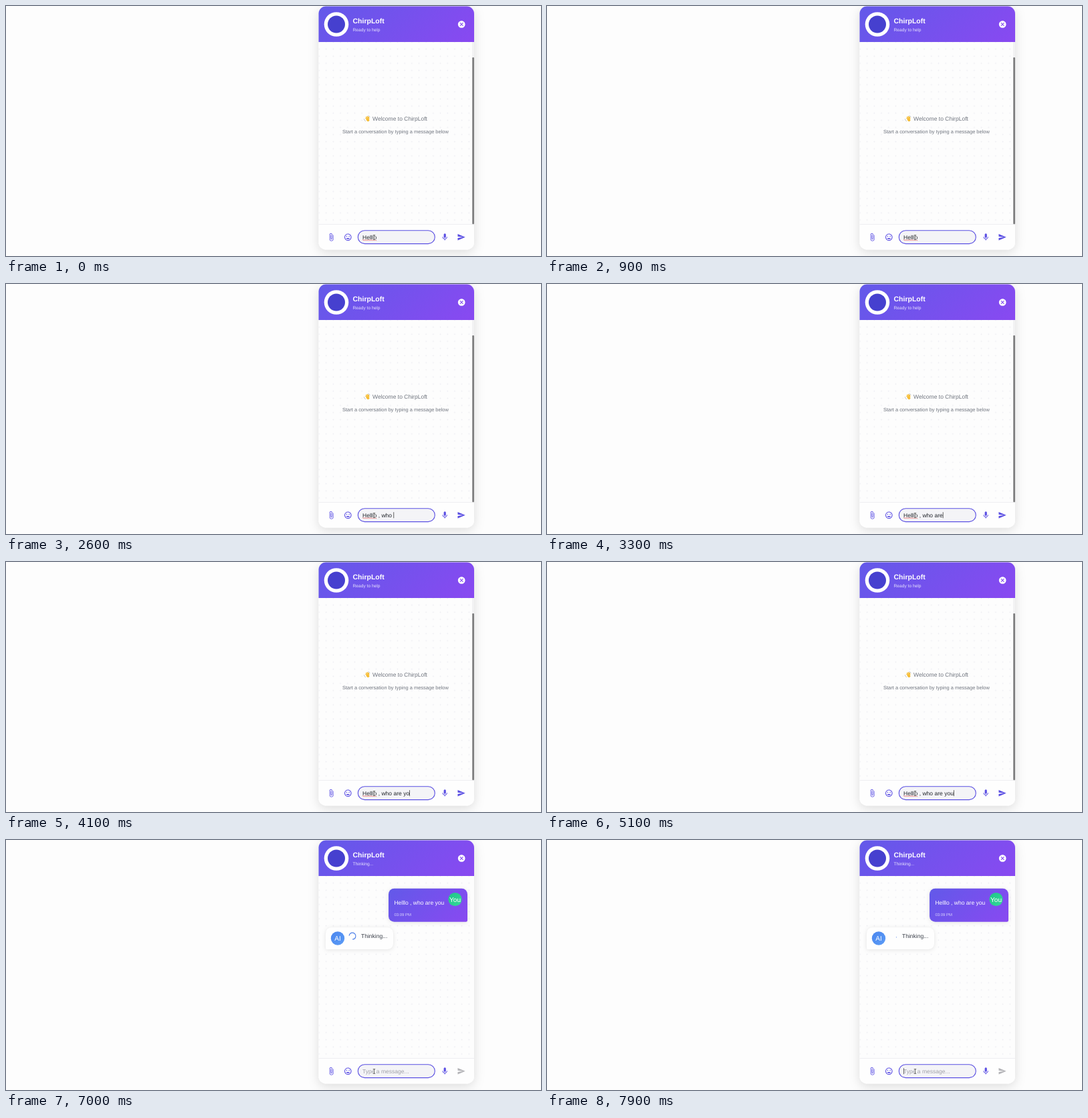
These frames come from a looping animation (800 by 375 pixels, 8 s). An HTML page:

```html
<!DOCTYPE html>
<html lang="en">
<head>
<meta charset="utf-8">
<title>Chat widget</title>
<style>
  html, body { margin: 0; width: 100%; height: 100%; overflow: hidden; background: #fdfdfd; }
  svg { display: block; width: 800px; height: 375px; }
  text {
    font: 8.54px "Liberation Sans", Arial, sans-serif;
    white-space: pre;
    text-rendering: geometricPrecision;
  }
  .window { filter: drop-shadow(0 4px 8px rgba(0, 0, 0, .13)); }
  .soft { filter: drop-shadow(0 1px 3px rgba(0, 0, 0, .1)); }
  .title { font-size: 10.5px; font-weight: bold; fill: #fff; }
  .status { font-size: 6.65px; fill: #e8e4fd; }
  .muted { fill: #70757f; }
  .hint { font-size: 7.49px; }
  .badge { font-size: 10px; fill: #fff; text-anchor: middle; }
  .time { font-size: 5.96px; fill: #d9d2fb; }
  .icon { fill: #5b4fe3; }
</style>
</head>
<body>
<svg viewBox="0 0 800 375">
  <defs>
    <linearGradient id="head" gradientUnits="userSpaceOnUse" x1="512" y1="-44" x2="656" y2="99">
      <stop offset="0" stop-color="#6259e9"/>
      <stop offset="1" stop-color="#8949f1"/>
    </linearGradient>
    <linearGradient id="bubble" gradientUnits="userSpaceOnUse" x1="589" y1="56" x2="673" y2="140">
      <stop offset="0" stop-color="#6259e9"/>
      <stop offset="1" stop-color="#8949f1"/>
    </linearGradient>
    <linearGradient id="blue" x2="1" y2="1">
      <stop offset="0" stop-color="#4a86ee"/>
      <stop offset="1" stop-color="#5c9cf6"/>
    </linearGradient>
    <linearGradient id="green" x2="1" y2="1">
      <stop offset="0" stop-color="#1fc587"/>
      <stop offset="1" stop-color="#34d99a"/>
    </linearGradient>
    <pattern id="dots" patternUnits="userSpaceOnUse" x="462.7" y="59.3" width="10.68" height="10.68">
      <circle cx="5.34" cy="5.34" r=".9" fill="#ececf1"/>
    </pattern>
    <clipPath id="frame"><rect x="467.5" y=".5" width="232.5" height="365" rx="10.7"/></clipPath>
  </defs>

  <rect width="800" height="375" fill="#fdfdfd"/>
  <rect class="window" x="467.5" y=".5" width="232.5" height="365" rx="10.7" fill="#fefefe"/>
  <g clip-path="url(#frame)">
    <rect x="467" y="54" width="234" height="273" fill="#fdfdfd"/>
    <rect x="467" y="54" width="234" height="273" fill="url(#dots)"/>
    <rect x="467" y="0" width="234" height="54" fill="url(#head)"/>
    <rect x="467" y="327" width="234" height="39" fill="#fefefe"/>
    <rect x="467" y="327" width="234" height=".6" fill="#e6e6ea"/>
  </g>

  <circle cx="494" cy="27.5" r="18.3" fill="#fff"/>
  <circle cx="494" cy="27.5" r="13" fill="#4640cf"/>
  <text class="title" x="518.5" y="26">ChirpLoft</text>
  <text class="status" id="status" x="518.5" y="38.2"></text>
  <path fill="#fff" transform="translate(674.8 21.1) scale(.534)" d="M12 2C6.47 2 2 6.47 2 12s4.47 10 10 10 10-4.47 10-10S17.53 2 12 2zm5 13.59L15.59 17 12 13.41 8.41 17 7 15.59 10.59 12 7 8.41 8.41 7 12 10.59 15.59 7 17 8.41 13.41 12 17 15.59z"/>

  <g id="welcome">
    <g fill="none" stroke="#f6bd35" stroke-linecap="round">
      <g stroke-width="1.4">
        <path d="M538 168.2l2.4 2.6M538.6 166.4l3 3.4M540.4 165.8l2.4 3M542.6 168.8l-.2-2.2"/>
      </g>
      <path stroke-width="4" d="M540.7 170.4l.7.7"/>
      <path stroke="#9a9fa8" stroke-width=".6" d="M535.4 169.6q.2 2.4 2.2 3.2M541.8 164.6q1.7.2 2.2 1.7"/>
    </g>
    <text class="muted" x="548" y="171.9">Welcome to ChirpLoft</text>
    <text class="muted hint" x="503" y="190.7">Start a conversation by typing a message below</text>
    <rect x="697" y="54" width="3" height="273" fill="#f2f2f3"/>
    <rect x="697.2" y="77" width="2.8" height="250.3" rx="1.3" fill="#7f7f80"/>
  </g>

  <g id="talk">
    <path class="soft" fill="url(#bubble)" d="M580.5 72.7h101a8.5 8.5 0 0 1 8.5 8.5v39.4a2.2 2.2 0 0 1-2.2 2.2h-107.3a8.5 8.5 0 0 1-8.5-8.5v-33.1a8.5 8.5 0 0 1 8.5-8.5z"/>
    <text x="580.4" y="96.8" fill="#fff">Helllo , who are you</text>
    <text class="time" x="580.4" y="114.3">03:09 PM</text>
    <circle cx="671.5" cy="89" r="10.1" fill="url(#green)"/>
    <text class="badge" x="671.5" y="92.6">You</text>

    <path class="soft" fill="#fefefe" d="M486.5 131.3h84a8.5 8.5 0 0 1 8.5 8.5v15.7a8.5 8.5 0 0 1-8.5 8.5h-90.3a2.2 2.2 0 0 1-2.2-2.2v-22a8.5 8.5 0 0 1 8.5-8.5z"/>
    <circle cx="496" cy="147.5" r="10.2" fill="url(#blue)"/>
    <text class="badge" x="496" y="151.1">AI</text>
    <circle id="spin" cx="518" cy="144" r="4.9" fill="none" stroke="#4d7fe8" stroke-width="1.1"/>
    <text x="531" y="146.9" fill="#3a3f49">Thinking...</text>
  </g>

  <path class="icon" transform="translate(480 340.3) scale(.534)" d="M16.5 6v11.5c0 2.21-1.79 4-4 4s-4-1.79-4-4V5c0-1.38 1.12-2.5 2.5-2.5s2.5 1.12 2.5 2.5v10.5c0 .55-.45 1-1 1s-1-.45-1-1V6H10v9.5c0 1.38 1.12 2.5 2.5 2.5s2.5-1.12 2.5-2.5V5c0-2.21-1.79-4-4-4S7 2.79 7 5v12.5c0 3.04 2.46 5.5 5.5 5.5s5.5-2.46 5.5-5.5V6h-1.5z"/>
  <path class="icon" transform="translate(504.9 340.4) scale(.534)" d="M11.99 2C6.47 2 2 6.48 2 12s4.47 10 9.99 10C17.52 22 22 17.52 22 12S17.52 2 11.99 2zM12 20c-4.42 0-8-3.58-8-8s3.58-8 8-8 8 3.58 8 8-3.58 8-8 8zm3.5-9c.83 0 1.5-.67 1.5-1.5S16.33 8 15.5 8 14 8.67 14 9.5s.67 1.5 1.5 1.5zm-7 0c.83 0 1.5-.67 1.5-1.5S9.33 8 8.5 8 7 8.67 7 9.5 7.67 11 8.5 11zm3.5 6.5c2.33 0 4.31-1.46 5.11-3.5H6.89c.8 2.04 2.78 3.5 5.11 3.5z"/>
  <path class="icon" transform="translate(649.8 340.3) scale(.534)" d="M12 14c1.66 0 2.99-1.34 2.99-3L15 5c0-1.66-1.34-3-3-3S9 3.34 9 5v6c0 1.66 1.34 3 3 3zm5.3-3c0 3-2.54 5.1-5.3 5.1S6.7 14 6.7 11H5c0 3.41 2.72 6.23 6 6.72V21h2v-3.28c3.28-.48 6-3.3 6-6.72h-1.7z"/>
  <path id="send" transform="translate(674.4 340.4) scale(.534)" d="M2.01 21L23 12 2.01 3 2 10l15 2-15 2z"/>

  <rect x="526.3" y="336.7" width="115" height="19.9" rx="9.95" fill="#f4f4f7" stroke="#5a4fe2" stroke-width="1.1"/>
  <text id="entry" x="533" y="349.6"></text>
  <path id="wave" fill="none" stroke="#e2443f" stroke-width=".7"/>
  <rect id="caret" y="342.2" width=".7" height="9" fill="#222"/>
  <g fill="none" stroke-linecap="round">
    <path id="beam" d="M549 343.8h3m-1.5 0v6.4m-1.5 0h3" stroke="#fff" stroke-width="1.5"/>
    <use href="#beam"/>
    <path d="M549 343.8h3m-1.5 0v6.4m-1.5 0h3" stroke="#2b2b2b" stroke-width=".7"/>
  </g>
</svg>
<script>
  const LOOP = 8000, SENT = 5380, BLINK = 530;
  const FIRST = "Helllo", REST = " , who are you";
  const TYPE_FROM = 1050, KEY = 250, LAST_KEY = 4600;
  const SPIN = 1400, SPIN_FROM = 5034;
  const $ = id => document.getElementById(id);
  const show = (id, on) => $(id).style.display = on ? "" : "none";
  const keyTime = i => i === REST.length - 1 ? LAST_KEY : TYPE_FROM + KEY * i;

  $("wave").setAttribute("d", "M533 351.2q.75-1 1.5 0" + "t1.5 0".repeat(13));

  function typedCount(t) {
    let n = 0;
    while (n < REST.length && t >= keyTime(n)) n++;
    return n;
  }

  function caretOn(t, n) {
    if (t < TYPE_FROM) return t >= 100 && t < 500;
    const since = t >= SENT ? SENT : keyTime(n - 1);
    return (t - since) % (2 * BLINK) < BLINK;
  }

  // Arc that grows, then shrinks from its tail, while the ring turns.
  function drawSpinner(t) {
    const p = (t - SPIN_FROM) / SPIN % 1;
    const u = p * 2 % 1, e = u * u * (3 - 2 * u);
    const grow = p < .5;
    const dash = grow ? 1 + 99 * e : 100 - 99 * e;
    const start = grow ? 15 * e : 15 + 111 * e;
    const unit = 4.9 / 20.2;
    const spin = $("spin");
    spin.setAttribute("stroke-dasharray", `${dash * unit} ${200 * unit}`);
    spin.setAttribute("transform", `rotate(${360 * (p + start / 126.9)} 518 144)`);
  }

  function draw(t) {
    const sent = t >= SENT, n = typedCount(t), entry = $("entry");
    show("welcome", !sent);
    show("talk", sent);
    show("wave", !sent);
    $("status").textContent = sent ? "Thinking..." : "Ready to help";
    $("send").setAttribute("fill", sent ? "#b4b4b8" : "#5b4fe3");
    entry.textContent = sent ? "Type a message..." : FIRST + REST.slice(0, n);
    entry.setAttribute("fill", sent ? "#a0a1a8" : "#22252c");
    $("caret").setAttribute("x", 533 + (sent ? 0 : entry.getComputedTextLength()));
    show("caret", caretOn(t, n));
    if (sent) drawSpinner(t);
  }

  const began = performance.now();
  function tick() {
    draw((performance.now() - began) % LOOP);
    requestAnimationFrame(tick);
  }
  tick();
</script>
</body>
</html>
```
